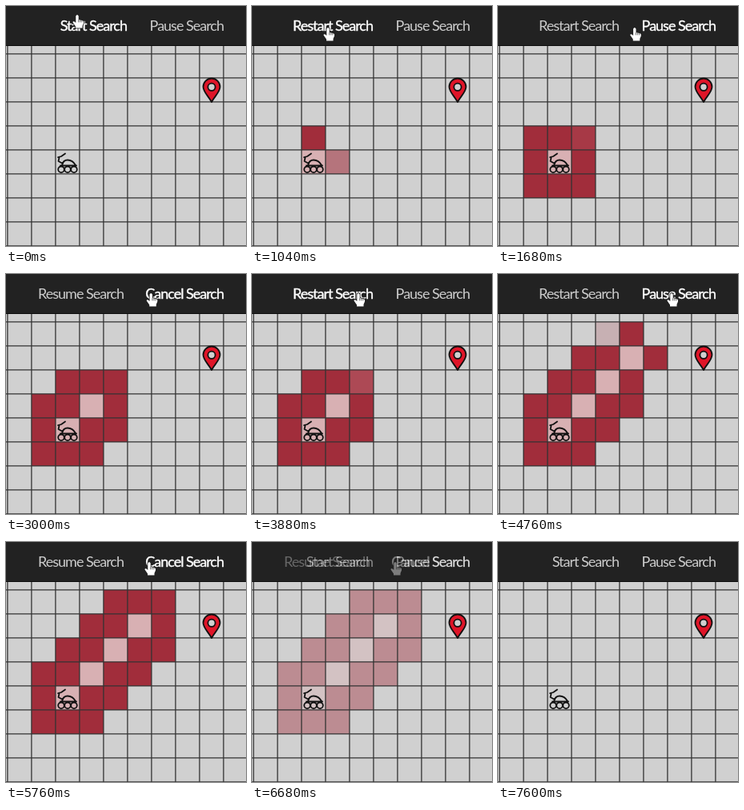
An HTML page with a canvas for the animation above (7640 ms loop, 300 px wide and 300 px high).

```html
<!DOCTYPE html>
<html lang="en">
<head>
<meta charset="utf-8">
<title>Path search</title>
<style>
  html, body { margin: 0; width: 100%; height: 100%; overflow: hidden; background: #d0d0d0; }
  canvas { position: absolute; left: 0; top: 0; }
</style>
</head>
<body>
<canvas id="live" width="300" height="300"></canvas>
<canvas id="idle" width="300" height="300"></canvas>
<script>
const LOOP = 7640, CELL = 30, STEP = 98, FADE = 98, TRAVEL = 400;
const CLICK = 720, START = 790, PAUSE = 2250, RESUME = 3860, PAUSE_AGAIN = 5030, CANCEL = 5760;
const live = document.getElementById('live'), idle = document.getElementById('idle');
const ramp = (t, from, length) => Math.max(0, Math.min(1, (t - from) / length));
const smooth = p => p * p * (3 - 2 * p);

// The search climbs a diagonal: each cell it enters reveals its unseen neighbours one by one,
// straight ones first, then the corners clockwise.
const cells = new Map();
let clock = START;
function tick() {
  const now = clock;
  clock += STEP;
  if (clock > PAUSE && clock < RESUME) clock = RESUME;
  return now;
}
function cellAt(col, row) {
  const key = col + ',' + row;
  if (!cells.has(key)) cells.set(key, { col, row, seen: Infinity, entered: Infinity });
  return cells.get(key);
}
for (let i = 0; i < 4; i++) {
  const col = 2 + i, row = 4 - i;
  cellAt(col, row).entered = tick();
  for (let k = 0; k < 8; k++) {
    const angle = (k < 4 ? k * 2 - 2 : k * 2 - 11) * Math.PI / 4;
    const near = cellAt(col + Math.round(Math.cos(angle)), row + Math.round(Math.sin(angle)));
    if (near.seen === Infinity && near.entered === Infinity) near.seen = tick();
  }
}

// Fingertip stops: [arrival, x, y]
const stops = [
  [0, 89, 11], [400, 95, 27], [1860, 226, 27], [2520, 187, 24],
  [3320, 133, 24], [4560, 217, 24], [5160, 183, 24], [CANCEL, 179, 25]
];
function cursorAt(t) {
  let [, x, y] = stops[0];
  for (const [arrival, nx, ny] of stops.slice(1)) {
    const e = smooth(ramp(t, arrival - TRAVEL, TRAVEL));
    x += (nx - x) * e;
    y += (ny - y) * e;
  }
  return [x, y];
}

const pin = new Path2D('M257 120C253 112.5 246.5 107.5 246.5 101A10.5 10.5 0 0 1 267.5 101C267.5 107.5 261 112.5 257 120Z');
const rover = new Path2D('M68 199.5H88M70 199C71 194.5 74 192.5 77 192.5C82 192.5 85 195.5 87 199' +
  'M74 184.5L69 188L65 189M66.5 189.5L65.5 194L71 197');
const hand = new Path2D('M-1.7 1.5Q0 -1.5 1.7 1.5V6L7 7.3Q8.5 8 8 10.5L6.5 14V16.5H-2V14.5L-5.5 9.5Q-5.5 7.5 -3.5 8.5L-1.7 10Z');

function circle(c, x, y, r) {
  c.beginPath();
  c.arc(x, y, r, 0, 7);
}

function drawBoard(c, t) {
  c.fillStyle = '#d0d0d0';
  c.fillRect(0, 0, 300, 300);
  for (const { col, row, seen, entered } of cells.values()) {
    for (const [color, from] of [['#a12d3b', seen], ['#d8b0b3', entered]]) {
      c.globalAlpha = ramp(t, from, FADE);
      c.fillStyle = color;
      c.fillRect(2 + col * CELL, 60 + row * CELL, CELL, CELL);
    }
  }
  c.globalAlpha = 1;

  c.beginPath();
  for (let i = 0; i < 10; i++) {
    const x = 1.9 + i * CELL, y = 59.9 + i * CELL;
    c.moveTo(x, 50); c.lineTo(x, 300);
    c.moveTo(0, y); c.lineTo(300, y);
  }
  c.strokeStyle = '#333';
  c.lineWidth = 1.3;
  c.stroke();

  c.strokeStyle = '#111';
  c.lineWidth = 1.8;
  c.lineCap = c.lineJoin = 'round';
  c.stroke(rover);
  for (const x of [69, 77, 85]) {
    circle(c, x, 204.3, 3.8);
    c.stroke();
  }

  c.fillStyle = '#df1528';
  c.fill(pin);
  c.stroke(pin);
  circle(c, 257, 101.3, 4.6);
  c.fillStyle = '#d0d0d0';
  c.fill();
  c.stroke();
}

function drawHeader(c, t, hover) {
  c.fillStyle = '#222';
  c.fillRect(0, 0, 300, 49);
  c.fillStyle = '#0c0c0c';
  c.fillRect(0, 49, 300, 1);

  const paused = t > PAUSE + 50 && t < RESUME || t > PAUSE_AGAIN;
  const left = t < CLICK ? 'Start' : paused ? 'Resume' : 'Restart';
  c.font = '18px Lato, "Open Sans", sans-serif';
  c.letterSpacing = '-1px';
  c.textAlign = 'right';
  c.lineWidth = .4;
  const label = (text, x, active) => {
    c.fillStyle = c.strokeStyle = active ? '#fff' : '#cdcdcd';
    c.fillText(text, x, 31);
    if (active) c.strokeText(text, x, 31);
  };
  label(left + ' Search', paused ? 147 : 151, hover === 'left');
  label((paused ? 'Cancel' : 'Pause') + ' Search', 272, hover === 'right');
}

function drawCursor(c, x, y) {
  c.save();
  c.translate(x, y);
  c.fillStyle = '#fff';
  c.strokeStyle = '#222';
  c.lineWidth = 1.6;
  c.stroke(hand);
  c.fill(hand);
  c.lineWidth = .7;
  c.beginPath();
  for (let i = 0; i < 3; i++) {
    c.moveTo(1.7 + i * 2.1, 6.5);
    c.lineTo(1.7 + i * 2.1, 9);
  }
  c.stroke();
  c.restore();
}

const front = live.getContext('2d'), still = idle.getContext('2d');

function frame(now) {
  const t = now % LOOP, [x, y] = cursorAt(t);
  drawBoard(front, t);
  drawHeader(front, t, x < 160 ? 'left' : 'right');
  drawCursor(front, x, y);
  idle.style.opacity = ramp(t, CANCEL, 1580); // dissolve to the cleared board
  requestAnimationFrame(frame);
}

drawBoard(still, 0);
drawHeader(still, 0);
frame(0);
</script>
</body>
</html>
```
